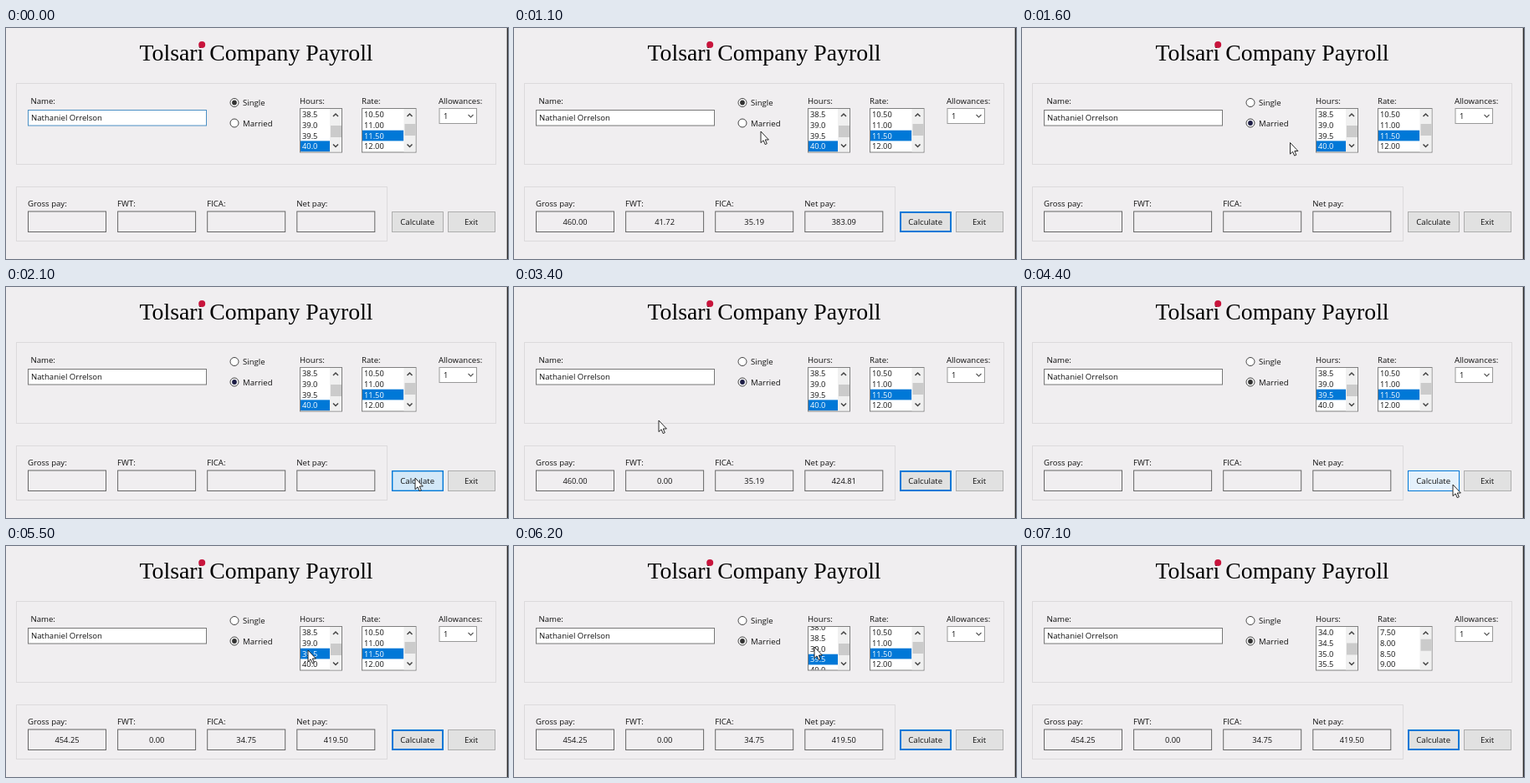
An HTML page that plays this animation: 600x277 px, repeating every 7.6 s.

```html
<!DOCTYPE html>
<html lang="en">
<head>
<meta charset="utf-8">
<title>Payroll form</title>
<style>
html, body { margin: 0; width: 100%; height: 100%; overflow: hidden; background: #f0eef0; }
svg { display: block; width: 100vw; height: 100vh; }
text { font: 9.6px "Open Sans", "Noto Sans", sans-serif; fill: #111; white-space: pre; }
.num { font-size: 9.3px; }
.mid { text-anchor: middle; }
.title { font: 27.8px "Liberation Serif", "Times New Roman", serif; fill: #000; }
</style>
</head>
<body>
<svg id="stage" viewBox="0 0 600 277" xmlns="http://www.w3.org/2000/svg"></svg>
<script>
const LOOP = 7600, STEP = 100, ROW = 12.7, LIST_TOP = 97.3;
const BLUE = '#0078d7', BG = '#f0eef0';
const stage = document.getElementById('stage');

// [time, x, y]
const cursorPath = [
  [100, 489, 229], [500, 489, 229], [600, 505, 232], [700, 526, 235], [800, 472, 203],
  [1100, 295, 124], [1300, 272, 112], [1500, 272, 112], [1900, 466, 214], [2100, 489, 229],
  [2200, 489, 229], [2500, 180, 177], [3300, 180, 177], [3400, 173, 160], [3700, 366, 127],
  [3900, 366, 127], [4300, 510, 233], [4400, 515, 237], [5400, 515, 237], [5500, 361, 125],
  [5700, 361, 125], [5800, 343, 123], [5900, 343, 123], [6000, 359, 121], [6500, 359, 121],
  [6600, 446, 116]
];
// [time, rows scrolled up]
const hoursScroll = [[6100, 0], [6200, 0.55], [6300, 3], [6400, 6], [6500, 9]];
const rateScroll = [[6600, 0], [6700, 2], [6800, 3], [6900, 5], [7000, 6]];

const within = (t, ...spans) => spans.some(([a, b]) => t >= a && t < b);

function sample(keys, t) {
  const next = keys.findIndex(k => k[0] > t);
  if (next === 0) return keys[0].slice(1);
  if (next < 0) return keys[keys.length - 1].slice(1);
  const a = keys[next - 1], b = keys[next];
  const p = (t - a[0]) / (b[0] - a[0]);
  return a.slice(1).map((v, i) => v + (b[i + 1] - v) * p);
}

const text = (x, y, s, cls = '', extra = '') =>
  `<text x="${x}" y="${y}" class="${cls}" ${extra}>${s}</text>`;

// Outlined box whose border lies inside the given edges
function box(x1, y1, x2, y2, fill, stroke, w = 1) {
  return `<rect x="${x1 + w / 2}" y="${y1 + w / 2}" width="${x2 - x1 - w}" height="${y2 - y1 - w}" ` +
    `fill="${fill}" stroke="${stroke}" stroke-width="${w}"/>`;
}

const chevron = (x, y, dir, color = '#444', w = 1.5) =>
  `<path d="M${x - 3} ${y - 1.5 * dir}L${x} ${y + 1.5 * dir}L${x + 3} ${y - 1.5 * dir}" ` +
  `fill="none" stroke="${color}" stroke-width="${w}"/>`;

function radio(y, label, on, dot) {
  return `<circle cx="273" cy="${y}" r="5" fill="#fff" stroke="#444"/>` +
    (on ? `<circle cx="273" cy="${y}" r="2.9" fill="${dot}"/>` : '') +
    text(283, y + 3.6, label);
}

function list(id, x1, x2, first, scroll, selected, digits, thumb) {
  const bar = x2 - 15;
  const start = Math.floor(-scroll);
  let rows = '';
  for (let i = start; i < start + 6; i++) {
    const value = first + i * 0.5, y = LIST_TOP + (i + scroll) * ROW, on = value === selected;
    if (on) rows += `<rect x="${x1 + 1}" y="${y}" width="${bar - x1 - 1}" height="${ROW}" fill="${BLUE}"/>`;
    rows += text(x1 + 3, y + 9.8, value.toFixed(digits), 'num', on ? 'style="fill:#fff"' : '');
  }
  return box(x1, 96, x2, 149.5, '#fff', '#7f7f7f') +
    `<clipPath id="${id}"><rect x="${x1 + 1}" y="97" width="${bar - x1 - 1}" height="51.5"/></clipPath>` +
    `<g clip-path="url(#${id})">${rows}</g>` +
    `<rect x="${bar}" y="97" width="14" height="51.5" fill="#f0f0f0"/>` +
    `<rect x="${bar + 1}" y="${thumb}" width="13" height="14" fill="#cbcbcb"/>` +
    chevron(bar + 7, 104.5, -1) + chevron(bar + 7, 141, 1);
}

function results(t) {
  if (within(t, [300, 1400])) return ['460.00', '41.72', '35.19', '383.09'];
  if (within(t, [2300, 3900])) return ['460.00', '0.00', '35.19', '424.81'];
  if (t >= 4700) return ['454.25', '0.00', '34.75', '419.50'];
  return ['', '', '', ''];
}

function calculateButton(t, hover) {
  let fill = '#e1e1e1', stroke = '#adadad', w = 1;
  if (hover) { fill = '#e5f1fb'; stroke = BLUE; }
  if (within(t, [200, 1400], [2300, 3900], [4700, LOOP])) { stroke = BLUE; w = 2; }
  if (within(t, [200, 300], [2100, 2300], [4500, 4700])) { fill = '#d3e8f8'; stroke = BLUE; w = 1.4; }
  return box(461, 220, 523, 245, fill, stroke, w) + text(491.7, 236, 'Calculate', 'mid');
}

const pointer = (x, y) =>
  `<path transform="translate(${x} ${y})" d="M0 0V13.6L3.1 10.8L5.2 15.6L7.3 14.7L5.3 10H9.4Z" ` +
  `fill="#fff" stroke="#111" stroke-width=".9"/>`;

function draw(t) {
  const [cx, cy] = sample(cursorPath, t);
  const shown = within(t, [100, 4800], [5500, 7000]);
  const hover = shown && cx >= 461 && cx <= 523 && cy >= 220 && cy <= 245;
  const married = t >= 1400;
  const dot = within(t, [1400, 3900]) ? '#1d1d45' : '#333';
  const hours = sample(hoursScroll, t)[0], rate = sample(rateScroll, t)[0];
  const values = results(t);

  stage.innerHTML =
    `<rect width="600" height="277" fill="${BG}"/>` +
    `<rect x="598.7" width="1.3" height="277" fill="#2a2a2a"/>` +
    text(159.5, 39, 'Tolsari Company Payroll', 'title') +
    `<circle cx="234.2" cy="20" r="4" fill="#c8143c"/>` +
    box(12, 66, 586, 164, 'none', '#dcdadc') +
    box(12, 190, 456, 256, 'none', '#dcdadc') +
    text(29.5, 91, 'Name:') +
    box(26, 98, 240, 117.5, '#fff', t < 200 ? '#4a8fc4' : '#777') +
    text(30, 111, 'Nathaniel Orrelson') +
    radio(89.5, 'Single', !married, dot) +
    radio(114, 'Married', married, dot) +
    text(351, 91, 'Hours:') +
    list('hours', 351, 402, 38.5, hours, t < 3900 ? 40 : 39.5, 1, 117 - hours * 0.06) +
    text(425, 91, 'Rate:') +
    list('rate', 425, 490.5, 10.5, rate, 11.5, 2, 115 - rate * 0.55) +
    text(517, 91, 'Allowances:') +
    box(517.5, 96, 563, 115, '#fff', '#999') +
    text(523, 108.5, '1', 'num') + chevron(555.5, 105.5, 1, '#555', 1.1) +
    ['Gross pay:', 'FWT:', 'FICA:', 'Net pay:'].map((label, i) => {
      const x = 26 + i * 107.1;
      return text(x, 214, label) + box(x, 219.5, x + 94, 245, BG, '#666') +
        text(x + 47, 236, values[i], 'num mid');
    }).join('') +
    calculateButton(t, hover) +
    box(528, 220, 585, 245, '#e1e1e1', '#adadad') + text(556, 236, 'Exit', 'mid') +
    (shown ? pointer(cx, cy) : '');
}

let last = -1;
const origin = performance.now();
function tick() {
  const elapsed = Math.max(0, performance.now() - origin) % LOOP;
  const t = Math.floor(elapsed / STEP) * STEP;
  if (t !== last) draw(last = t);
  requestAnimationFrame(tick);
}
tick();
</script>
</body>
</html>
```
